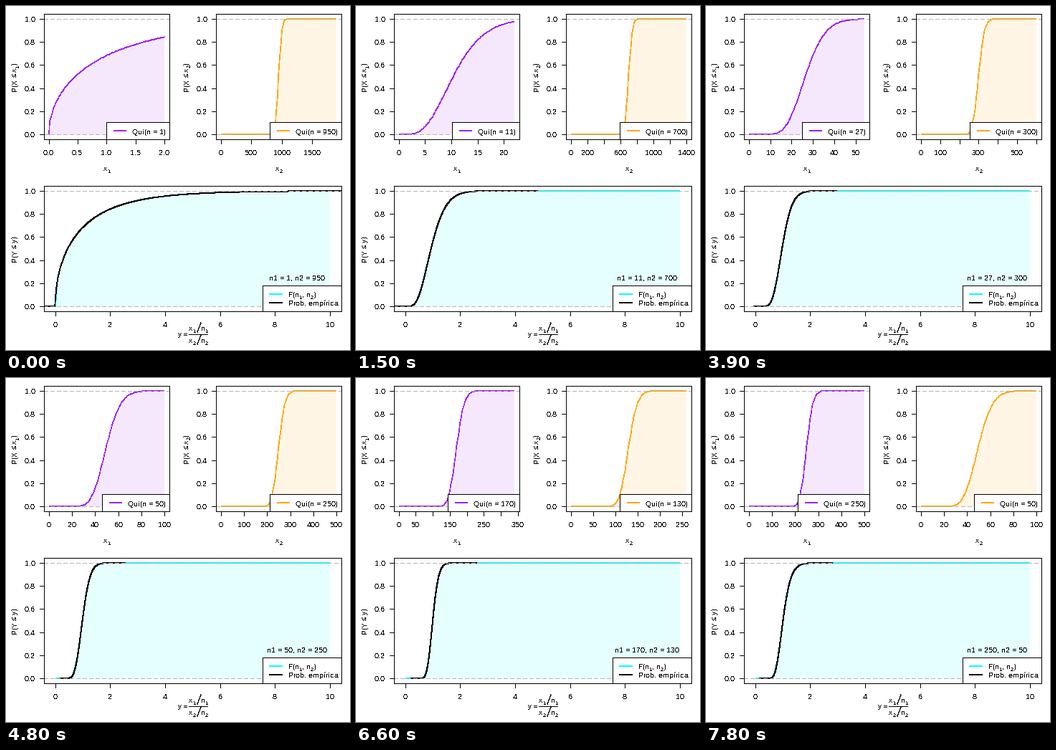
Write a matplotlib script that moves like this. It is 480 px wide and 480 px high and loops after 8 s.

```python
import math

import numpy as np
import matplotlib.pyplot as plt
from matplotlib.animation import FuncAnimation
from matplotlib.patches import Polygon, Rectangle

plt.rcParams.update({
    "font.family": "Liberation Sans",
    "font.size": 10,
    "text.hinting": "native",
    "text.hinting_factor": 1,
    "text.antialiased": False,
    "path.snap": False,
})

SIZE, DPI = 480, 72
STEP_TICKS, LAST = 3, 26
PAD = 0.04 / 1.08
# Without antialiasing every touched pixel is filled, so a thin pen on a
# pixel boundary paints two pixels.
CURVE, HAIR = 0.6, 0.1
PURPLE, ORANGE, CYAN, GRAY = "#A020F0", "#FFA500", "#00FFFF", "#B3B3B3"

N1 = [*range(1, 30, 2), *range(30, 251, 20)]
N2 = [*range(950, 249, -50), *range(270, 49, -20)]

# Extent of the empirical step line along the y axis variable.
EXTENT_AT = [0, 1, 2, 3, 5, 9, 13, 18, 22, 26]
EXTENT_LO = [-2, -1.5, -1, -0.8, -0.53, -0.28, -0.08, 0.34, 0.18, 0.13]
EXTENT_HI = [14, 9.3, 6.7, 5.5, 4.82, 3.29, 2.98, 2.27, 2.62, 2.82]

fig = plt.figure(figsize=(SIZE / DPI, SIZE / DPI), dpi=DPI, facecolor="white")
ax = fig.add_axes([0, 0, 1, 1])
ax.set_xlim(0, SIZE)
ax.set_ylim(SIZE, 0)
ax.axis("off")


def line(xs, ys, color="black", width=1, z=5, **style):
    return ax.plot(xs, ys, color=color, lw=width, zorder=z, antialiased=False,
                   solid_capstyle="butt", dash_capstyle="butt",
                   solid_joinstyle="round", **style)[0]


def text(x, y, label, ha="left", size=10, rotation=0):
    return ax.text(x, y, label, ha=ha, va="baseline", fontsize=size, zorder=7,
                   rotation=rotation, rotation_mode="anchor")


def box(x0, y0, x1, y1, fill, z):
    return ax.add_patch(Rectangle((x0 + .5, y0 + .5), x1 - x0, y1 - y0,
                                  facecolor=fill, edgecolor="black", lw=1,
                                  zorder=z, antialiased=False))


class Panel:
    """A plot box in pixels whose y axis always runs from 0 to 1."""

    def __init__(self, left, top, right, bottom):
        self.left, self.top, self.right, self.bottom = left, top, right, bottom
        pad_x, pad_y = (right - left) * PAD, (bottom - top) * PAD
        self.x0, self.x1 = left + pad_x, right - pad_x
        self.y0, self.y1 = bottom - pad_y, top + pad_y

    def px(self, x, xmax):
        return np.floor(self.x0 + np.asarray(x) / xmax * (self.x1 - self.x0))

    def py(self, p):
        return np.floor(self.y0 + np.asarray(p) * (self.y1 - self.y0))

    def draw_frame(self):
        l, t, r, b = map(math.floor, (self.left, self.top, self.right, self.bottom))
        box(l, t, r, b, "none", 6)
        for p in np.arange(6) / 5:
            y = self.py(p)
            line([l - 6, l], [y + .5, y + .5])
            text(l - 12, y + 4, f"{p:.1f}", "right")
        for p in (0, 1):
            y = self.py(p) + .5
            line([l, r], [y, y], GRAY, z=3, dashes=(5, 3))

    def draw_ticks(self, xmax):
        unit = tick_unit(1.08 * xmax)
        artists, free_from = [], -math.inf
        for i in range(int(1.04 * xmax / unit + 1e-9) + 1):
            value = i * unit
            x = float(self.px(value, xmax))
            b = math.floor(self.bottom)
            artists.append(line([x + .5, x + .5], [b, b + 7]))
            label = f"{value:.1f}" if unit < 1 else f"{value:.0f}"
            half = 3 * len(label) - 1.5 * label.count(".")
            if x - half >= free_from:
                artists.append(text(math.floor(x - half), b + 22, label))
                free_from = x + half + 9.5
        return artists

    def draw_cdf(self, xs, ps, xmax, color):
        px, py = self.px(xs, xmax), self.py(ps)
        base = self.py(0)
        outline = [(px[0], base), *zip(px, py), (px[-1], base)]
        area = ax.add_patch(Polygon(outline, facecolor=color, alpha=.1, lw=0,
                                    zorder=1, antialiased=False))
        return [area, line(px, py, color, CURVE, 2)]

    def draw_legend(self, label, digits, color):
        r, b = math.floor(self.right), math.floor(self.bottom)
        l = r - 82 - 6 * digits
        return [box(l, b - 24, r, b, "white", 4),
                line([l + 10, l + 28], [b - 12, b - 12], color, 2),
                text(l + 36, b - 7, label)]


def tick_unit(span, divisions=5):
    """Round tick spacing, favouring 1, 2 and 5 times a power of ten."""
    cell = span / divisions
    base = 10 ** math.floor(math.log10(cell))
    unit = base
    for factor, bias in ((2, .8), (5, 1.7), (10, .8)):
        if factor * base - cell < bias * (cell - unit):
            unit = factor * base
    return unit


def integrate(xs, log_density):
    """CDF at xs from a log density in t = sqrt(x)."""
    t = np.linspace(1e-9, math.sqrt(max(xs)), 4000)
    d = np.exp(log_density(t))
    total = np.concatenate([[0], np.cumsum((d[1:] + d[:-1]) / 2 * np.diff(t))])
    return np.minimum(np.interp(np.sqrt(np.maximum(xs, 0)), t, total), 1)


def chi2_cdf(xs, n):
    scale = math.log(2) * (1 - n / 2) - math.lgamma(n / 2)
    return integrate(xs, lambda t: scale + (n - 1) * np.log(t) - t * t / 2)


def f_cdf(xs, n1, n2):
    half = (n1 + n2) / 2
    scale = (math.log(2) + n1 / 2 * math.log(n1 / n2) + math.lgamma(half)
             - math.lgamma(n1 / 2) - math.lgamma(n2 / 2))
    return integrate(xs, lambda t: scale + (n1 - 1) * np.log(t)
                     - half * np.log1p(n1 * t * t / n2))


def subscripted(x, y, letter, index):
    text(x, y, letter)
    text(x + 6, y + 3, index, size=7)


def rotated(x, pieces):
    for y, label in pieces:
        sub = label.isdigit()
        text(x + 3 * sub, y, label, size=7 if sub else 10, rotation=90)


first = Panel(53.78, 11.95, 228.05, 186.22)
second = Panel(293.78, 11.95, 468.05, 186.22)
ratio = Panel(53.78, 251.95, 468.05, 426.22)


def draw_static():
    for panel in (first, second, ratio):
        panel.draw_frame()
    for offset, index in ((0, "1"), (240, "2")):
        subscripted(136 + offset, 230, "x", index)
        rotated(15 + offset, [(119, "P(X"), (99, "≤"), (92, "x"),
                              (86, index), (82, ")")])
    rotated(15, [(357, "P(Y"), (338, "≤"), (330, "y"), (324, ")")])

    ratio.draw_ticks(10)
    text(240, 461, "y")
    text(247, 461, "=")
    line([255, 282], [458.5, 458.5])
    for y, index in ((453, "1"), (470, "2")):
        subscripted(255, y, "x", index)
        line([267, 272], [y + 2, y - 11], width=HAIR)
        subscripted(272, y, "n", index)

    box(358, 390, 468, 426, "white", 4)
    line([367, 386], [402, 402], CYAN, 2)
    line([367, 386], [414, 414], "black", 2)
    text(394, 406, "F(")
    subscripted(403, 406, "n", "1")
    text(413, 406, ",")
    subscripted(419, 406, "n", "2")
    text(430, 406, ")")
    text(394, 418, "Prob. empírica")


def draw_step(k):
    n1, n2 = N1[k], N2[k]
    artists = []
    for panel, n, color in ((first, n1, PURPLE), (second, n2, ORANGE)):
        xs = np.linspace(0, 2 * n, 101)
        artists += panel.draw_cdf(xs, chi2_cdf(xs, n), 2 * n, color)
        artists += panel.draw_ticks(2 * n)
        artists += panel.draw_legend(f"Qui(n = {n})", len(str(n)), color)

    ys = np.linspace(0, 10, 101)
    artists += ratio.draw_cdf(ys, f_cdf(ys, n1, n2), 10, CYAN)
    lo = max(np.interp(k, EXTENT_AT, EXTENT_LO), -0.4)
    hi = min(np.interp(k, EXTENT_AT, EXTENT_HI), 10.4)
    ys = np.linspace(lo, hi, 1200)
    artists.append(line(ratio.px(ys, 10), ratio.py(f_cdf(ys, n1, n2)),
                        "black", CURVE, 2.5))
    artists.append(text(406, 383, f"n1 = {n1}, n2 = {n2}", "center"))
    return artists


current = []


def update(frame):
    while current:
        current.pop().remove()
    current.extend(draw_step(min(frame // STEP_TICKS, LAST)))
    return current


draw_static()
anim = FuncAnimation(fig, update, frames=80, interval=100, init_func=lambda: [],
                     repeat=True, repeat_delay=0, blit=False)
plt.show()
```
